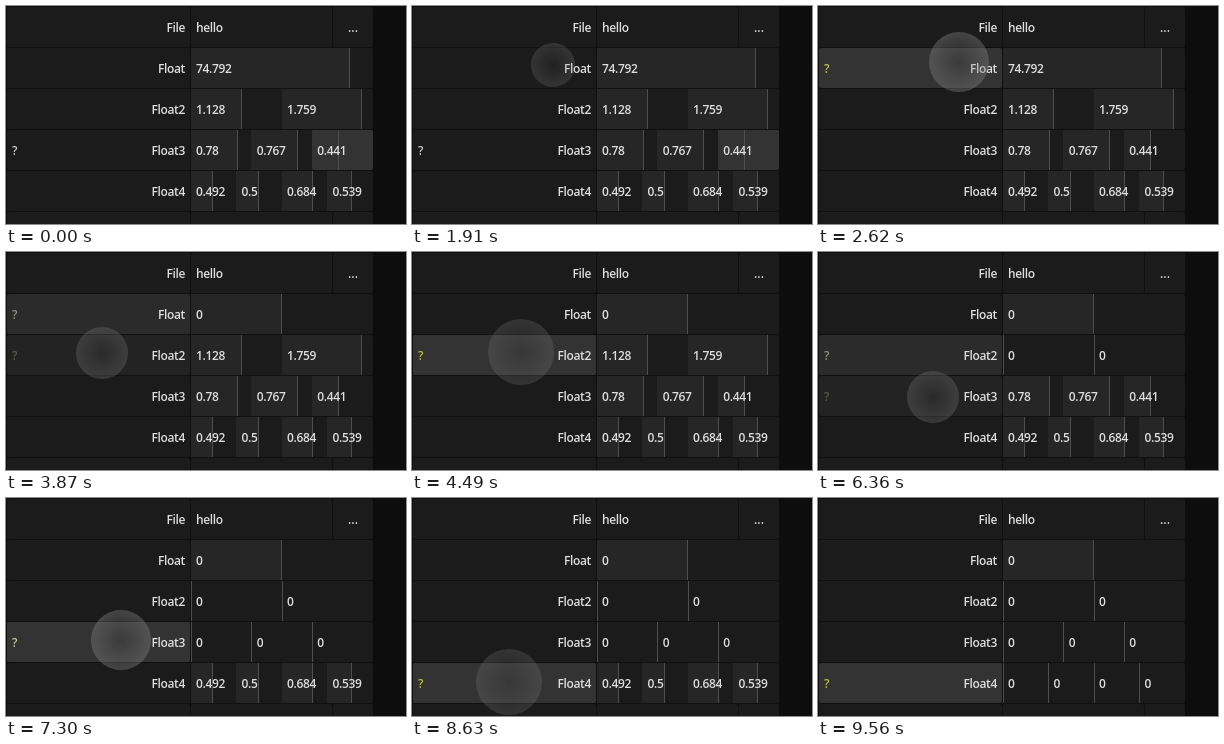
These frames come from a looping animation (400x218 px, 9.95 s). An HTML page:

```html
<!DOCTYPE html>
<html lang="en">
<head>
<meta charset="utf-8">
<title>Property grid reset</title>
<style>
html, body { margin: 0; width: 100%; height: 100%; overflow: hidden; background: #101010; }
svg { display: block; }
text { font: 600 12px "Open Sans", "Noto Sans", sans-serif; letter-spacing: -.35px; fill: #dedede; }
</style>
</head>
<body>
<svg id="stage" width="400" height="218" viewBox="0 0 400 218"></svg>
<script>
const LOOP = 9950, LEFT = 185, WIDTH = 182, ROW = 41, STEP = 77;

// A tap selects a row, a long press resets it
const rows = [
  { name: 'Float', values: [74.792], min: -100, max: 100,
    tap: 1910, press: 2540, reset: 3010, release: 3320, leave: 3790, tapAt: [141, 59], pressAt: [141, 56] },
  { name: 'Float2', values: [1.128, 1.759], min: 0, max: 2,
    tap: 3790, press: 4490, reset: 4880, release: 5730, leave: 6280, tapAt: [96, 101], pressAt: [109, 100] },
  { name: 'Float3', values: [0.78, 0.767, 0.441], min: 0, max: 1,
    tap: 6280, press: 6910, reset: 7300, release: 7610, leave: 8080, tapAt: [115, 145], pressAt: [115, 142] },
  { name: 'Float4', values: [0.492, 0.5, 0.684, 0.539], min: 0, max: 1,
    tap: 8080, press: 8630, reset: 9020, release: 9410, leave: LOOP, tapAt: [97, 186], pressAt: [97, 184] }
];

const clamp = v => Math.max(0, Math.min(1, v));
const stepsSince = (t, start) => Math.floor((t - start + 4) / STEP);
const fade = (t, start) => t < start ? 0 : clamp(stepsSince(t, start) / 3);
const mix = (a, b, k) => `rgb(${a.map((v, i) => Math.round(v + (b[i] - v) * k))})`;

const rect = (x, y, w, h, fill, extra = '') =>
  `<rect x="${x}" y="${y}" width="${w}" height="${h}" fill="${fill}" ${extra}/>`;
const cell = (x, y, w) => rect(x, y, w, 40, '#1b1b1b', 'rx="2"');
const glow = (x, y, w, k) => rect(x, y, w, 40, '#333', `rx="2" opacity="${k}"`);
const text = (x, y, s, extra = '') => `<text x="${x}" y="${y + 25}" ${extra}>${s}</text>`;
const label = (y, s) => text(179, y, s, 'text-anchor="end"');
const ball = ([x, y], r, k) => `<circle cx="${x}" cy="${y}" r="${r}" fill="url(#ball)" opacity="${k}"/>`;

const defs = `<defs><radialGradient id="ball">
  <stop offset="0" stop-color="#808080" stop-opacity=".1"/>
  <stop offset="1" stop-color="#808080" stop-opacity=".42"/>
</radialGradient></defs>`;

const fileRow = (y, name, value, button) =>
  cell(1, y, 183) + cell(LEFT, y, 141) + cell(327, y, 40) + label(y, name) + text(190, y, value) +
  text(347, y, button, 'text-anchor="middle" style="letter-spacing:0"');

function helpMark(row, y, t) {
  let k = fade(t, row.tap) - fade(t, row.leave), grey = 1 - k;
  if (row.name === 'Float3' && t < row.tap) {
    k = 1 - fade(t, rows[0].tap);
    grey = 1;
  } else if (t >= row.leave) grey = 0.7;
  else if (t >= row.release) grey = 1 - clamp((t - row.release) / 150);
  else if (t >= row.press) grey = clamp((t - row.press) / 550);
  const fill = mix([180, 190, 66], [200, 200, 200], grey);
  return k > 0 ? text(6, y, '?', `style="fill:${fill}" opacity="${k}"`) : '';
}

function floatRow(row, i, t) {
  const y = 1 + ROW * (i + 1), w = WIDTH / row.values.length;
  const lit = fade(t, row.tap) - fade(t, row.leave);
  let out = cell(1, y, 183) + glow(1, y, 183, lit) + cell(LEFT, y, WIDTH);
  row.values.forEach((v, n) => {
    const x = LEFT + n * w, value = t < row.reset ? v : 0;
    const part = (value - row.min) / (row.max - row.min) * w;
    const start = Math.floor(x), mark = Math.max(start, Math.floor(x + part - 1));
    out += rect(start, y, mark - start, 40, '#262626');
    if (i === 2 && n === 2) out += glow(start, y, 61, 1 - fade(t, rows[0].tap));
    out += rect(mark, y, 1, 40, '#4e4e4e') + text(x + 5, y, value);
  });
  return out + label(y, row.name) + helpMark(row, y, t);
}

function touches(row, t) {
  const tap = stepsSince(t, row.tap);
  let out = '';
  if (t >= row.tap && tap < 3) out += ball(row.tapAt, [22, 26, 30][tap], [0.6, 0.7, 0.35][tap]);
  if (t >= row.release) {
    const s = stepsSince(t, row.release);
    if (s < 2) out += ball(row.pressAt, 29.5, [0.85, 0.4][s]);
  } else if (t >= row.press) {
    out += stepsSince(t, row.press) < 1 ? ball(row.pressAt, 33, 0.6) : ball(row.pressAt, 30, 1);
  }
  return out;
}

const stage = document.getElementById('stage');
function draw() {
  const t = performance.now() % LOOP;
  stage.innerHTML = defs + rect(0, 0, 400, 218, '#101010') + rect(367, 0, 33, 218, '#0d0d0d') +
    fileRow(1, 'File', 'hello', '...') +
    rows.map((row, i) => floatRow(row, i, t)).join('') +
    fileRow(206, '', '', '') +
    rows.map(row => touches(row, t)).join('');
  requestAnimationFrame(draw);
}
draw();
</script>
</body>
</html>
```
